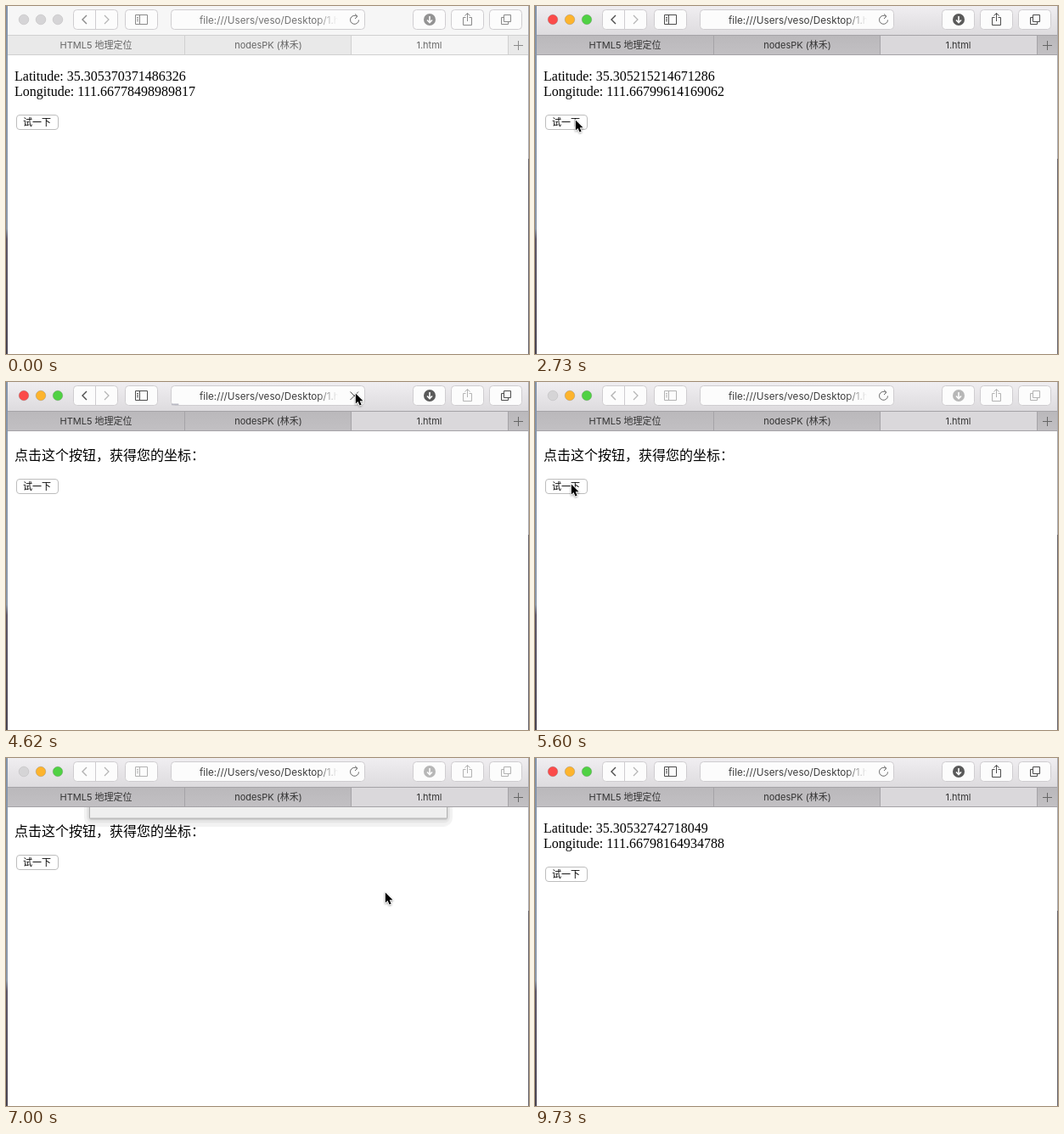
These frames come from a looping animation (616 px wide and 410 px high, 9.87 s). An HTML page:

```html
<!DOCTYPE html>
<html lang="zh">
<head>
<meta charset="utf-8">
<title>Geolocation demo</title>
<style>
html, body { margin: 0; width: 100%; height: 100%; overflow: hidden; background: #fff; }
svg { display: block; width: 616px; height: 410px; overflow: hidden; }
text { font-family: Inter, "Noto Sans CJK SC", "Noto Sans CJK", sans-serif; white-space: pre; }

.tab { font-size: 11px; fill: #333; text-anchor: middle; }
.url { font-size: 11.7px; fill: url(#fade); }
.serif text { font: 16px "Liberation Serif", "Noto Sans CJK SC", "Noto Sans CJK", serif; }
.ui { font-size: 13.2px; fill: #111; }
.mid { text-anchor: middle; }
.bold { font-weight: 700; }
.btn rect { fill: #fff; stroke: #bdbdbd; }
.btn text { font-size: 11px; }
.hit rect { fill: url(#blue); stroke: #2a70dc; }
.hit text { fill: #fff; }
.field { fill: #fcfcfc; stroke: #cfcdd0; }
.icon { fill: none; stroke: #4c4c4c; stroke-width: 1.2; }
.wire { fill: none; stroke: #a5a3a7; }
.gray circle { fill: #d5d4d6; stroke: #bfbec0; stroke-width: .6; }
.lamp { stroke: #000; stroke-opacity: .12; stroke-width: .7; }
.arrow { filter: drop-shadow(0 1px 1px rgba(0, 0, 0, .35)); }

/* one shared loop; states switch hard, movement is eased */
.state { animation: 9.87s step-end infinite; }
.move { animation: 9.87s linear infinite; }

.idle { animation-name: idle; }
.awake { animation-name: awake; }
.ink { animation-name: ink; }
.tools { animation-name: tools; }
.close { animation-name: close; }
.share { animation-name: share; }
.reload { animation-name: reload; }
.stop { animation-name: stop; }
.fix1 { animation-name: fix1; }
.fix2 { animation-name: fix2; }
.fix3 { animation-name: fix3; }
.fix4 { animation-name: fix4; }
.prompt { animation-name: prompt; }
.try { animation-name: try; }
.press { animation-name: press; }
.allow { animation-name: allow; }
.sheet { animation-name: sheet; }
.load { animation-name: load; transform-origin: 195px 26px; }
.pointer { animation-name: pointer; }

@keyframes idle { 0% { opacity: 1 } 9.92%, to { opacity: 0 } }
@keyframes awake { 0% { opacity: 0 } 9.92%, to { opacity: 1 } }
@keyframes ink { 0% { opacity: .72 } 9.92%, to { opacity: 1 } }
@keyframes tools {
  0% { opacity: .65 } 9.92% { opacity: 1 }
  56.73% { opacity: .42 } 72.33%, to { opacity: 1 }
}
@keyframes close {
  0% { opacity: 0 } 9.92% { opacity: 1 }
  56.73% { opacity: 0 } 72.33%, to { opacity: 1 }
}
@keyframes share { 0% { opacity: 1 } 46.09% { opacity: .4 } 49.64%, to { opacity: 1 } }
@keyframes reload { 0% { opacity: 1 } 45.38% { opacity: 0 } 49.64%, to { opacity: 1 } }
@keyframes stop { 0% { opacity: 0 } 45.38% { opacity: 1 } 49.64%, to { opacity: 0 } }

@keyframes fix1 { 0% { opacity: 1 } 22.69%, to { opacity: 0 } }
@keyframes fix2 { 0% { opacity: 0 } 22.69% { opacity: 1 } 32.61%, to { opacity: 0 } }
@keyframes fix3 { 0% { opacity: 0 } 32.61% { opacity: 1 } 46.09%, to { opacity: 0 } }
@keyframes prompt { 0% { opacity: 0 } 46.09% { opacity: 1 } 75.17%, to { opacity: 0 } }
@keyframes fix4 { 0% { opacity: 0 } 75.17%, to { opacity: 1 } }
@keyframes try {
  0% { transform: none } 46.09% { transform: translateY(-14px) }
  75.17%, to { transform: none }
}
@keyframes press {
  0% { opacity: 0 }
  21.27% { opacity: 1 } 21.98% { opacity: 0 }
  30.49% { opacity: 1 } 31.2% { opacity: 0 }
  56.02% { opacity: 1 } 56.73%, to { opacity: 0 }
}
@keyframes allow { 0% { opacity: 0 } 66.66% { opacity: 1 } 67.37%, to { opacity: 0 } }
@keyframes sheet {
  0%, 57.1% { transform: translateY(-145px); animation-timing-function: ease-out }
  60.28%, 67.88% { transform: none }
  70.92% { transform: translateY(-116px) }
  71.63%, to { transform: translateY(-145px) }
}
@keyframes load {
  0%, 46.09% { transform: scaleX(0) }
  46.8% { transform: scaleX(.03) }
  49.5% { transform: scaleX(1) }
  49.51%, to { transform: scaleX(0) }
}
@keyframes pointer {
  0%, 5.66% { transform: translate(270px, 440px) }
  5.67% { transform: translate(270px, 394px) }
  7.09%, 9.92% { transform: translate(48px, 79px); animation-timing-function: ease-in-out }
  17.02%, 38.2% { transform: translate(47px, 133px); animation-timing-function: ease-in-out }
  43.97%, 49.64% { transform: translate(411px, 12px); animation-timing-function: ease-in-out }
  55.31%, 59.2% { transform: translate(42px, 119px); animation-timing-function: ease-in-out }
  65.24%, 73.2% { transform: translate(446px, 157px); animation-timing-function: ease-out }
  78.01%, 79% { transform: translate(116px, 150px); animation-timing-function: ease-in-out }
  82.27%, 83.2% { transform: translate(66px, 139px); animation-timing-function: ease-in }
  85.6% { transform: translate(155px, 398px) }
  85.81%, 95.02% { transform: translate(210px, 440px) }
  95.03% { transform: translate(211px, 403px) }
  97.87% { transform: translate(331px, 405px) }
  98.57%, to { transform: translate(331px, 440px) }
}
</style>
</head>
<body>
<svg viewBox="0 0 616 410" width="616" height="410">
  <defs>
    <linearGradient id="bar" x2="0" y2="1">
      <stop stop-color="#f0eef1"/><stop offset="1" stop-color="#dddbde"/>
    </linearGradient>
    <linearGradient id="tabs" x2="0" y2="1">
      <stop stop-color="#bab8bb"/><stop offset="1" stop-color="#c2c0c3"/>
    </linearGradient>
    <linearGradient id="blue" x2="0" y2="1">
      <stop stop-color="#6fb2fb"/><stop offset="1" stop-color="#1c6ff5"/>
    </linearGradient>
    <linearGradient id="edge" x2="0" y2="1">
      <stop stop-color="#8394ab"/><stop offset=".64" stop-color="#8b98aa"/>
      <stop offset=".67" stop-color="#5d5768"/><stop offset="1" stop-color="#484352"/>
    </linearGradient>
    <linearGradient id="fade" gradientUnits="userSpaceOnUse" x1="366" x2="391" y1="0" y2="0">
      <stop stop-color="#3c3c3c"/><stop offset="1" stop-color="#3c3c3c" stop-opacity="0"/>
    </linearGradient>
    <clipPath id="page"><path d="M2 58H615V410H2Z"/></clipPath>
  </defs>

  <rect width="616" height="410" fill="#fff"/>

  <!-- page -->
  <g class="serif">
    <g class="state fix1"><text x="10" y="88">Latitude: 35.305370371486326</text><text x="10" y="106">Longitude: 111.66778498989817</text></g>
    <g class="state fix2"><text x="10" y="88">Latitude: 35.305215214671286</text><text x="10" y="106">Longitude: 111.66799614169062</text></g>
    <g class="state fix3"><text x="10" y="88">Latitude: 35.305264829103524</text><text x="10" y="106">Longitude: 111.66788215374906</text></g>
    <g class="state fix4"><text x="10" y="88">Latitude: 35.30532742718049</text><text x="10" y="106">Longitude: 111.66798164934788</text></g>
    <text class="state prompt" x="10" y="92">点击这个按钮，获得您的坐标：</text>
  </g>
  <g class="state try">
    <g class="btn">
      <rect x="12.5" y="128.5" width="49" height="17" rx="3.5"/>
      <text x="20" y="141">试一下</text>
    </g>
    <g class="state press">
      <g class="btn hit">
        <rect x="12.5" y="128.5" width="49" height="17" rx="3.5"/>
        <text x="20" y="141">试一下</text>
      </g>
    </g>
  </g>

  <!-- permission sheet -->
  <g clip-path="url(#page)">
    <g class="move sheet">
      <g fill-opacity=".05">
        <rect x="92" y="30" width="434" height="167" rx="10"/>
        <rect x="95" y="30" width="428" height="163" rx="7"/>
        <rect x="97" y="30" width="424" height="160" rx="4"/>
        <rect x="98" y="30" width="422" height="158.5" rx="2" fill-opacity=".18"/>
      </g>
      <rect x="99" y="30" width="420" height="157" fill="#efefef"/>
      <circle cx="155" cy="106" r="29" fill="#2f86df"/>
      <text class="ui bold" x="205.5" y="88">网站“file://”想使用您当前的位置。</text>
      <rect x="205.5" y="105.5" width="13" height="13" rx="2.5" fill="#fff" stroke="#b5b5b5"/>
      <text class="ui" x="223" y="117">在一天内记住我的决定</text>
      <g class="btn">
        <rect x="327.5" y="147.5" width="78" height="20" rx="4"/>
        <rect x="420.5" y="147.5" width="78" height="20" rx="4"/>
      </g>
      <text class="ui mid" x="366.5" y="162">不允许</text>
      <text class="ui mid" x="459.5" y="162">允许</text>
      <g class="state allow">
        <g class="hit">
          <rect x="420.5" y="147.5" width="78" height="20" rx="4"/>
          <text class="ui mid" x="459.5" y="162" style="fill:#fff">允许</text>
        </g>
      </g>
    </g>
  </g>

  <!-- window chrome -->
  <rect width="616" height="34" fill="url(#bar)"/>
  <rect y="34" width="616" height="24" fill="url(#tabs)"/>
  <rect x="407" y="34" width="184" height="24" fill="#dad8db"/>
  <path class="wire" d="M2 34.5H616M2 57.5H616M210.5 34V58M406.5 34V58M591.5 34V58"/>
  <g class="state idle">
    <rect width="616" height="34" fill="#f6f6f6"/>
    <rect y="34" width="616" height="24" fill="#e9e9e9"/>
    <rect x="407" y="34" width="184" height="24" fill="#f5f5f5"/>
    <path class="wire" style="stroke:#d0d0d0" d="M2 34.5H616M2 57.5H616M210.5 34V58M406.5 34V58M591.5 34V58"/>
  </g>

  <g class="gray"><circle cx="21" cy="16" r="5.8"/><circle cx="41" cy="16" r="5.8"/><circle cx="61" cy="16" r="5.8"/></g>
  <circle class="lamp state close" cx="21" cy="16" r="5.7" fill="#fb4b4a"/>
  <g class="lamp state awake">
    <circle cx="41" cy="16" r="5.7" fill="#fdb42e"/>
    <circle cx="61" cy="16" r="5.7" fill="#50d144"/>
  </g>

  <g class="field">
    <rect x="79.5" y="4.5" width="52" height="23" rx="4"/>
    <rect x="140.5" y="4.5" width="38" height="23" rx="4"/>
    <rect x="194.5" y="4.5" width="228" height="23" rx="4"/>
    <rect x="479.5" y="4.5" width="38" height="23" rx="4"/>
    <rect x="524.5" y="4.5" width="38" height="23" rx="4"/>
    <rect x="569.5" y="4.5" width="38" height="23" rx="4"/>
    <path d="M105.5 5V27"/>
  </g>
  <path class="icon" style="stroke:#b4b4b4" d="M116 11L121 16L116 21"/>

  <g class="state tools">
    <path class="icon" style="stroke-width:1.4" d="M95 11L90 16L95 21"/>
    <path class="icon" style="stroke-width:1" d="M152.5 10.5H166.5V21.5H152.5ZM157.5 11V21M154 13.5H156M154 15.5H156M154 17.5H156"/>
    <circle cx="499" cy="16" r="7" fill="#5a5a5a"/>
    <path d="M499 12V19M496 16.5L499 19.5L502 16.5" fill="none" stroke="#fff" stroke-width="1.6"/>
    <path class="icon state share" style="stroke-width:1" d="M541.5 13.5H538.5V22.5H548.5V13.5H545.5M543.5 18V8.5M540.5 11.5L543.5 8.5L546.5 11.5"/>
    <path class="icon" style="stroke-width:1" d="M586.5 13.5H583.5V21.5H591.5V18.5M586.5 10.5H594.5V18.5H586.5Z"/>
  </g>

  <g class="state ink">
    <text class="url" x="228" y="20.5">file:///Users/veso/Desktop/1.html</text>
    <text class="tab" x="106" y="50">HTML5 地理定位</text>
    <text class="tab" x="309" y="50">nodesPK (林禾)</text>
    <text class="tab" x="498.5" y="50">1.html</text>
    <path class="icon" style="stroke:#666;stroke-width:1" d="M598 46.5H609M603.5 41V52"/>
  </g>
  <g class="state reload">
    <path class="icon" style="stroke:#666;stroke-width:1" d="M413.5 12.3A5 5 0 1 0 415.5 16.5"/>
    <path class="icon" style="stroke:#666;stroke-width:1" d="M411 9.5L414 12.3L411 15"/>
  </g>
  <path class="icon state stop" style="stroke-width:1" d="M405.5 11.5L415 21M415 11.5L405.5 21"/>
  <rect class="move load" x="195" y="25.5" width="227" height="1.8" fill="#b9b9c3"/>

  <rect width="2" height="410" fill="url(#edge)"/>
  <rect x="615" width="1" height="180" fill="#a9a9af"/>
  <rect x="615" y="180" width="1" height="230" fill="#66636c"/>

  <g class="move pointer">
    <path class="arrow" d="M.8 1.4V13.6L3.6 11L5.5 15.6L7.6 14.7L5.7 10.2H9.5Z" stroke="#fff" stroke-width="1.6" stroke-linejoin="round" paint-order="stroke"/>
  </g>
</svg>
</body>
</html>
```
